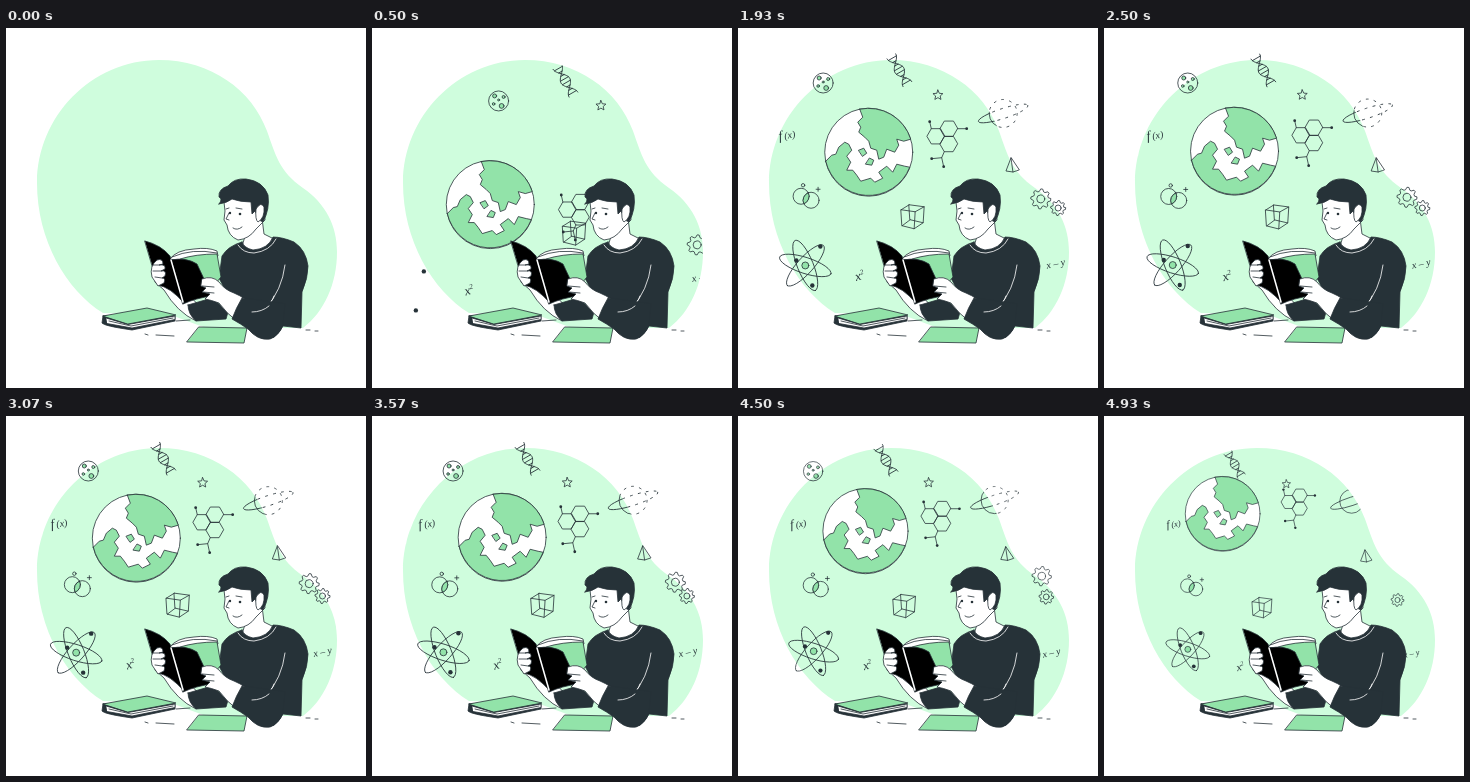
An HTML page that plays this animation: 360x360 px, repeating every 5 s.

```html
<!DOCTYPE html>
<html lang="en">
<head>
<meta charset="utf-8">
<title>Reading about science</title>
<style>
html, body { margin: 0; width: 100%; height: 100%; overflow: hidden; background: #fff; }
svg { display: block; width: 100vw; height: 100vh; }
.ink { stroke: #263238; stroke-width: .8; stroke-linejoin: round; stroke-linecap: round; fill: none; }
.green { fill: #92e3a9; }
.white { fill: #fff; }
.dark { fill: #263238; }
.dot { fill: #263238; stroke: none; }
.light { stroke: #fff; }
.gap { stroke-dasharray: var(--gap); }
text { font: italic 13px "Liberation Serif", serif; fill: #263238; stroke: none; text-anchor: middle; }
.small { font-size: 10px; }
</style>
</head>
<body>
<svg viewBox="0 0 360 360">
  <defs>
    <path id="blob" d="M153 32C205 32 246 62 261 103C270 128 273 143 297 160C320 176 331 198 331 224C331 256 318 284 297 300H200L165 287L97 285C60 262 31 212 31 155C31 89 85 32 153 32Z"/>
    <clipPath id="inside"><use href="#blob"/></clipPath>
  </defs>

  <use id="outer" href="#icons" style="--gap:2 6"/>
  <g id="loose"><g data-icon="atom" class="dot">
    <circle cx="15" cy="-19" r="2.2"/><circle cx="7" cy="20" r="2.2"/>
  </g></g>
  <use href="#blob" fill="#cffddd"/>

  <g clip-path="url(#inside)">
    <g id="icons" class="ink">
      <g data-icon="moon">
        <circle r="10"/>
        <g class="green"><circle cx="-4" cy="-5" r="2"/><circle cx="5" cy="-4" r="1.5"/><circle cx="-5" cy="3" r="1.3"/><circle cx="3" cy="5" r="2.4"/><circle cx="0" cy="-1" r="1"/></g>
      </g>
      <g data-icon="dna"><path id="helix" transform="rotate(-30)"/></g>
      <g data-icon="star"><path id="star"/></g>
      <g data-icon="globe">
        <circle r="44" class="white"/>
        <g class="green">
          <path d="M-9-43L-6-35L-11-30L-8-25L-10-20L-4-15L0-11L2-4L8-2L10 7L15 5L18-3L26 0L30-7L28-13L35-11L42-13A44 44 0 0 0-9-43Z"/>
          <path d="M-43 9L-37 3L-33 2L-30-5L-24-10L-20-8L-17-2L-22 4L-18 10L-22 18L-16 18L-12 23L-8 29L2 26L6 30L14 26L10 20L18 14L24 20L28 12L36 14L41 15A44 44 0 0 1-43 9Z"/>
          <path d="M-10-2L-5-4L-2 1L-6 4Z"/><path d="M1 6L5 8L3 13L-3 12Z"/>
        </g>
      </g>
      <g data-icon="molecule">
        <path id="hexes"/>
        <path d="M-12.400-8L-14-15M13.800-8H23M.6 15L-2 21L-12 22M-2 21L0 30"/>
        <g class="dot"><circle cx="-14" cy="-15" r="1.4"/><circle cx="23" cy="-8" r="1.4"/><circle cx="-12" cy="22" r="1.4"/><circle cx="0" cy="30" r="1.4"/></g>
      </g>
      <g data-icon="cube"><path d="M-11-6L3-4L2 13L-10 10ZM-3-11L12-9L11 7L-2 4ZM-11-6L-3-11M3-4L12-9M2 13L11 7M-10 10L-2 4"/></g>
      <g data-icon="planet" class="gap"><circle r="14"/><ellipse rx="26" ry="5" transform="rotate(-18)"/></g>
      <g data-icon="pyramid"><path d="M-1-7L-6 6L1 7L7 5ZM-1-7L1 7"/></g>
      <g data-icon="gear"><path id="gearA"/><circle r="4"/></g>
      <g data-icon="cog"><path id="gearB"/><circle r="3"/></g>
      <g data-icon="venn">
        <circle cx="-5" cy="-2" r="8"/><circle cx="5" cy="2" r="8"/>
        <path class="green" d="M2.200-5.500A8 8 0 0 1-2.200 5.500A8 8 0 0 1 2.200-5.500Z"/>
        <circle cx="-3" cy="-13" r="1.700"/><path d="M10-9H14M12-11V-7"/>
      </g>
      <g data-icon="fx"><text y="5" transform="rotate(-10)">f<tspan class="small" dx="2">(x)</tspan></text></g>
      <g data-icon="atom">
        <ellipse rx="27" ry="8" transform="rotate(18)"/><ellipse rx="27" ry="8" transform="rotate(68)"/><ellipse rx="27" ry="8" transform="rotate(132)"/>
        <circle r="3.500" class="green"/>
        <g class="dot"><circle cx="15" cy="-19" r="2.200"/><circle cx="-9" cy="-5" r="2.200"/><circle cx="7" cy="20" r="2.200"/></g>
      </g>
      <g data-icon="square"><text x="-1" y="5" transform="rotate(-16)">x<tspan dy="-5" font-size="7">2</tspan></text></g>
      <g data-icon="minus"><text class="small" y="3" transform="rotate(-12)">x – y</text></g>
    </g>
  </g>

  <g class="ink">
    <!-- table and closed book -->
    <path d="M139 306L142 307M150 307L168 308M170 293L184 292M300 302H304M309 303H312"/>
    <path class="dark" d="M97 288L96 295Q98 298 126 302L169 293V288Z"/>
    <path class="white" d="M100 290L122 296.500L169 288V291.500L126 300L101 295.500Z"/>
    <path d="M103 293L125 298L167 290"/>
    <path class="green" d="M97 288L141 280L170 287L122 296Z"/>
    <path class="green" d="M193 299L241 300L238 315L181 314Z"/>

    <!-- far arm -->
    <path class="white" d="M149 254L158 262Q171 284 190 293L200 285L178 262Z"/>
    <path class="dark" d="M182 277L206 270L222 284L220 291L190 293Q182 286 182 277Z"/>

    <!-- torso -->
    <path class="white" d="M240 205L237 215Q234 221 247 224Q262 221 268 211L258 206L256 190Z"/>
    <path class="dark" d="M236 214Q222 218 216 228L213 250L226 275L248 305Q258 314 268 309Q274 304 277 298L295 300L296 264Q302 250 302 238Q300 222 288 214Q276 209 267 209Q262 221 247 222Q238 220 236 214Z"/>
    <path class="light" d="M232 217Q237 225 248 225Q264 223 270 211M279 237Q276 262 260 280M268 268Q266 275 258 280"/>

    <!-- head -->
    <path class="white" d="M218 174L219 183L218 192L221 197Q222 208 232 212Q243 211 250 201L259 192L257 165L230 165Z"/>
    <path class="dark" d="M213 176Q217 171 213 169Q212 161 222 158Q228 150 240 151Q257 153 262 167Q264 181 257 194L253 192L249 183L246 186L245 174Q234 174 226 171Q221 175 213 176Z"/>
    <path class="white" d="M250 181Q255 173 258 179Q259 190 252 194Q249 192 250 181Z"/>
    <path d="M223 185L220 191L223 192M227 200Q231 203 236 199M220 181L223 180M230 180L236 181"/>
    <g class="dot"><circle cx="224" cy="185" r="1.200"/><circle cx="234" cy="186" r="1.300"/></g>

    <!-- open book -->
    <path class="white" d="M164 231Q170 222 188 221Q202 219 211 223L212 228L172 232Z"/>
    <path d="M166 229Q186 220 211 225"/>
    <path class="green" d="M174 231Q190 226 211 226L215 249L204 262L180 250Z"/>
    <path fill="#000" d="M165 232Q180 229 191 236L206 268Q190 270 177 276Z"/>
    <path fill="#000" d="M139 213Q155 217 164 228L178 275Q164 259 152 257Z"/>
    <path class="light" stroke-width="1.500" d="M165 232L177 274"/>

    <!-- hands -->
    <path class="white" d="M151 232Q157 230 157 236L153 237Q160 236 159 241L155 243Q161 242 159 248L156 250Q160 250 158 255L152 258L146 249Q143 238 151 232Z"/>
    <path d="M147 237L153 237M147 243L155 243M149 249L156 250"/>
    <path class="white" d="M196 251Q206 247 213 254Q219 262 228 265Q240 270 246 278L232 294Q221 286 213 275Q205 272 199 271L204 266L196 264L200 260L195 258Z"/>
    <path d="M196 258L208 259M197 264L208 265"/>
    <path class="dark" d="M236 270Q230 280 226 291Q235 296 242 301Q252 313 264 311Q273 308 277 297L279 276Z"/>
    <path class="light" d="M246 284Q256 284 263 278"/>
  </g>
</svg>

<script>
const LOOP = 5000;
const $ = id => document.getElementById(id);

// place at mid-loop, slow drift, entry offset, exit offset
const ICONS = {
  moon:     [83.5, 55, -7, 0, 38, 18, -17, 1],
  dna:      [159, 42.5, -10, 1, 27, 11, -20, 5],
  star:     [198, 67, -8, -1, 25, 10, -9, 2],
  globe:    [130.5, 123, -1, -5, -13, 50, -11, -21],
  molecule: [204.5, 107.5, -5, -5, -5, 71, -9, -17],
  cube:     [172.5, 188, -7, 1, 24, 17, -9, 2],
  planet:   [263.5, 85, -7, -2, 32, -18, -10, 2],
  pyramid:  [273, 137, -4, 0, 32, 8, -8, 3],
  gear:     [303, 169, 1, -8, 23, 42, 0, -16],
  cog:      [318, 180, -9, 0, 40, 12, -17, 4],
  venn:     [70, 170.5, 8, 1, -49, -4, 11, 0],
  fx:       [51, 106, 10, 1, -38, -5, 10, 0],
  atom:     [69, 237, 7, -2, -27, 24, 9, -2],
  square:   [124, 247, 7, 1, -21, 15, 7, 2],
  minus:    [317, 236, -3, 1, 10, 14, -7, 1]
};

const clamp = v => Math.max(0, Math.min(1, v));
const ramp = (t, a, b) => clamp((t - a) / (b - a));

const outline = (n, radius, turn = 0, cx = 0, cy = 0) =>
  "M" + Array.from({ length: n }, (_, i) => {
    const a = i / n * 2 * Math.PI + turn, r = radius(i);
    return (cx + r * Math.cos(a)).toFixed(2) + " " + (cy + r * Math.sin(a)).toFixed(2);
  }).join("L") + "Z";

function helix(half, amp) {
  const at = (y, side) => side * amp * Math.cos(y / half * Math.PI);
  let d = "";
  for (const side of [-1, 1])
    for (let y = -half; y <= half; y++)
      d += (y === -half ? "M" : "L") + at(y, side).toFixed(2) + " " + y;
  for (let y = 2 - half; y < half; y += 4) d += `M${at(y, -1)} ${y}L${at(y, 1)} ${y}`;
  return d;
}

const gear = r => outline(32, i => i % 4 < 2 ? r : r * .76);
const draw = (id, d) => $(id).setAttribute("d", d);
draw("helix", helix(16, 5));
draw("star", outline(10, i => i % 2 ? 2.4 : 5.2, -Math.PI / 2));
draw("hexes", [[5, -8], [-8, -.4], [5, 7.4]].map(([x, y]) => outline(6, () => 8.8, 0, x, y)).join(""));
draw("gearA", gear(10));
draw("gearB", gear(7.5));

const parts = [...document.querySelectorAll("[data-icon]")].map(el => [el, ICONS[el.dataset.icon]]);

function render(t) {
  const drift = (t - 2600) / 2800;
  const enter = (Math.max(0, 1400 - t) / 900) ** 3;
  const leave = ramp(t, 4000, 4930) ** 2.5;
  const size = 1 - .15 * leave;
  for (const [el, [x, y, dx, dy, ix, iy, ox, oy]] of parts) {
    const px = x + dx * drift + ix * enter + ox * leave;
    const py = y + dy * drift + iy * enter + oy * leave;
    el.setAttribute("transform", `translate(${px.toFixed(2)} ${py.toFixed(2)}) scale(${size.toFixed(3)})`);
  }
  const shown = ramp(t, 70, 320);
  $("icons").style.opacity = shown;
  $("loose").style.opacity = shown;
  $("outer").style.opacity = ramp(t, 600, 850) * (1 - ramp(t, 4450, 4850));
}

const start = performance.now();
function tick() {
  render((performance.now() - start) % LOOP);
  requestAnimationFrame(tick);
}
render(0);
requestAnimationFrame(tick);
</script>
</body>
</html>
```
